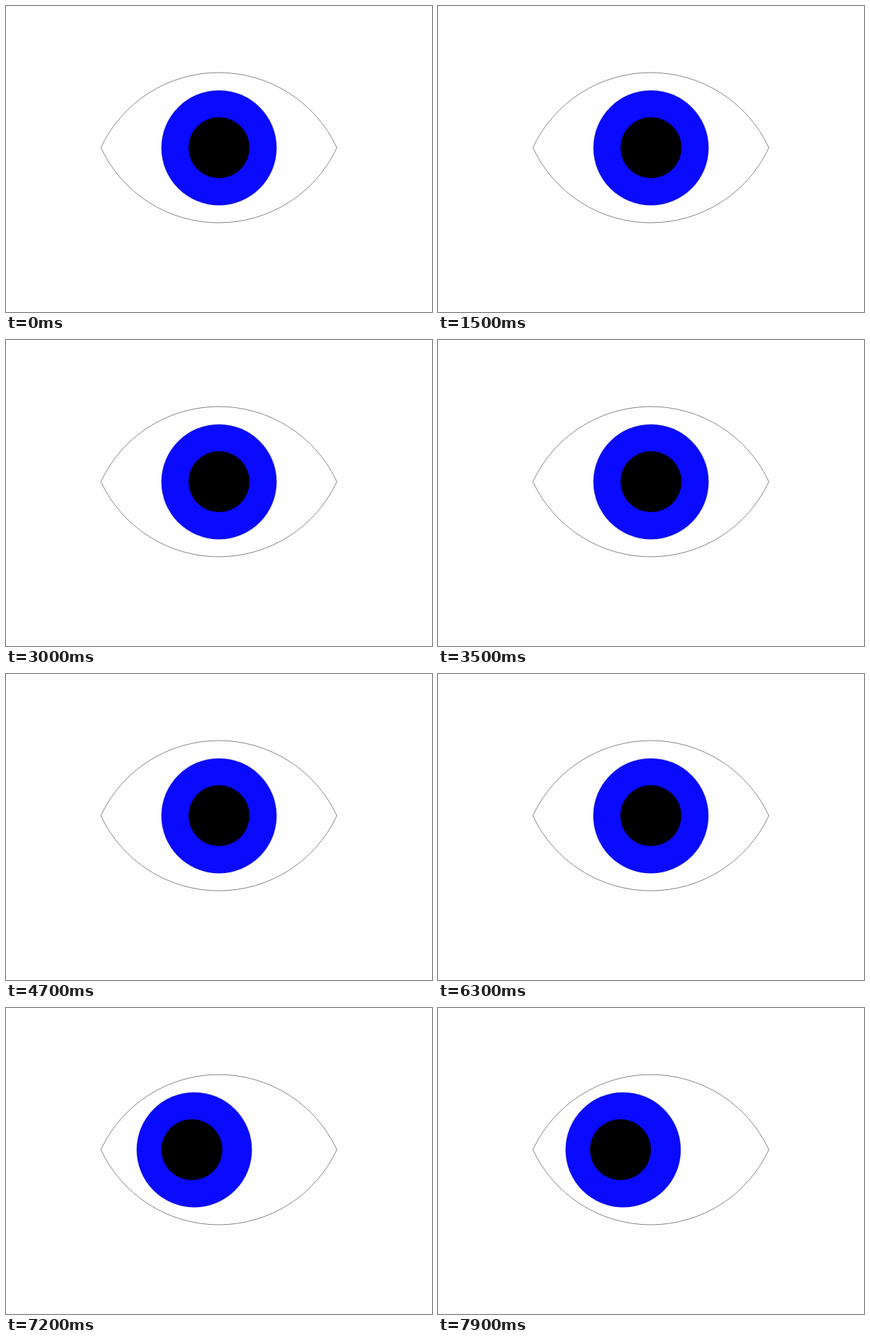
An HTML page that plays this animation: 600 by 432 pixels, repeating every 8 s.

```html
<!DOCTYPE html>
<html lang="en">
<head>
<meta charset="utf-8">
<title>Eye</title>
<style>
  html, body { margin: 0; width: 100%; height: 100%; overflow: hidden; background: #fefefe; }
  svg { display: block; width: 600px; height: 432px; }
</style>
</head>
<body>
<svg viewBox="0 0 600 432">
  <path d="M133.6 200A183.3 183.3 0 0 1 466 200A183.3 183.3 0 0 1 133.6 200Z" fill="none" stroke="#707070" stroke-width=".85"/>
  <circle id="iris" cx="300" cy="200.2" r="81" fill="#0a0aff" stroke="#0808a0" stroke-width=".4"/>
  <circle id="pupil" cx="300" cy="200" r="43"/>
</svg>
<script>
  const LOOP = 8000, STEP = 100;
  const glance = { start: 6250, end: 7450, iris: -39.2, pupil: -43 };
  const iris = document.getElementById('iris');
  const pupil = document.getElementById('pupil');
  const begin = performance.now();

  const smooth = u => u * u * (3 - 2 * u);
  const clamp = u => Math.min(1, Math.max(0, u));

  function draw() {
    const now = (performance.now() - begin) % LOOP;
    const time = Math.floor(now / STEP) * STEP;
    const turn = smooth(clamp((time - glance.start) / (glance.end - glance.start)));
    iris.setAttribute('cx', 300 + glance.iris * turn);
    pupil.setAttribute('cx', 300 + glance.pupil * turn);
    requestAnimationFrame(draw);
  }
  draw();
</script>
</body>
</html>
```
